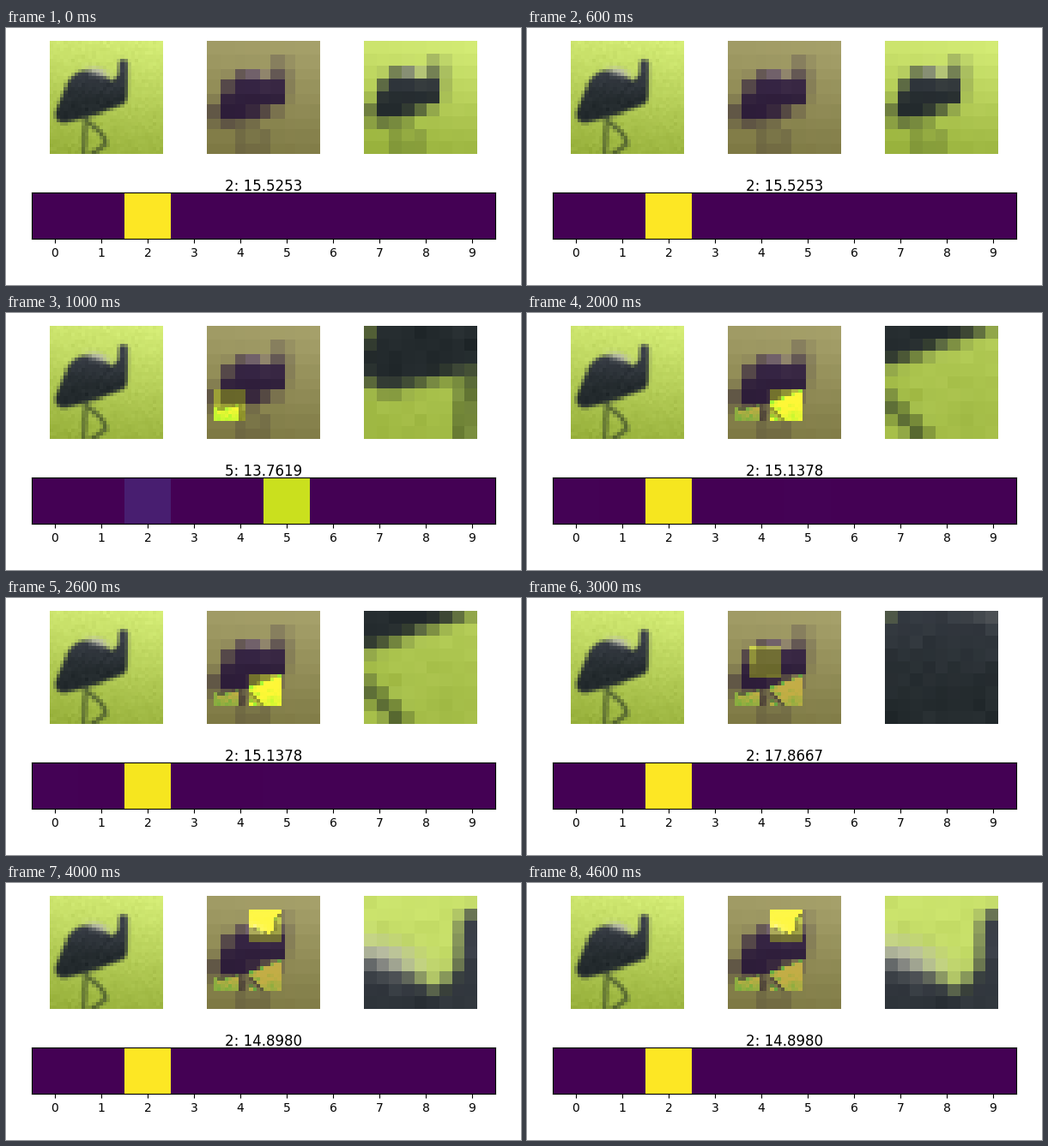
Write a matplotlib script that moves like this. It is 600 px wide and 300 px high and loops after 5000 ms.

```python
import numpy as np
import matplotlib.pyplot as plt
from matplotlib.animation import FuncAnimation

N, G = 32, 9          # picture and glimpse size in cells
FINE = N * G          # sampling grid that divides evenly into both
PURPLE = np.array([68, 1, 84])
YELLOW = np.array([253, 231, 37])

# glimpse corner, title, class scores
STEPS = [
    (None, "2: 15.5253", {2: 1}),
    ((2, 18), "5: 13.7619", {2: .085, 5: .92}),
    ((12, 18), "2: 15.1378", {0: .006, 2: .985, 5: .006}),
    ((6, 10), "2: 17.8667", {2: 1}),
    ((12, 4), "2: 14.8980", {2: 1}),
]

ys, xs = np.mgrid[:FINE, :FINE] / G + .5 / G


def limb(*joints):
    """Soft mask of circles (x, y, radius) swept from joint to joint."""
    gap = np.full(xs.shape, np.inf)
    for a, b in zip(joints, joints[1:]):
        for t in np.linspace(0, 1, 25):
            cx, cy, r = (1 - t) * np.array(a) + t * np.array(b)
            gap = np.minimum(gap, np.hypot(xs - cx, ys - cy) - r)
    return np.clip(.5 - gap / 1.1, 0, 1)[..., None]


def fade(top, bottom, y0, y1):
    t = np.clip((ys - y0) / (y1 - y0), 0, 1)[..., None]
    return np.array(top) * (1 - t) + np.array(bottom) * t


def blend(under, over, mask):
    return under * (1 - mask) + over * mask


def shrink(img, n):
    k = len(img) // n
    return img.reshape(n, k, n, k, 3).mean(axis=(1, 3))


def paint_bird():
    img = fade((210, 234, 115), (153, 178, 61), 0, 32)
    img += .25 * (xs - 14)[..., None]
    legs = np.maximum(
        limb((10.2, 21, .5), (9.7, 32, .5)),
        limb((10.6, 22.5, .5), (14.6, 26.4, .5), (15.9, 29, .5), (12, 32, .5)))
    img = blend(img, np.array([62, 76, 44]), legs)
    body = limb((4, 20.8, 2.4), (10.8, 14.8, 6.5), (18.6, 15.5, 3.2),
                (20.7, 10, 1.3), (20.8, 6.4, 1.2))
    img = blend(img, fade((58, 63, 72), (36, 43, 46), 8, 17), body)
    # pale sheen along the upper back
    dx = xs - 13.8
    sheen = np.exp(-(dx / 2.8) ** 2 - ((ys - 8.8 - .25 * dx) / 1.2) ** 2)
    img = blend(img, np.array([190, 190, 180]), .9 * sheen[..., None])
    grain = np.random.default_rng(4).normal(0, 2.5, (N, N, 1))
    return img + grain.repeat(G, 0).repeat(G, 1)


def to_rgb(img):
    return np.clip(img, 0, 255).astype(np.uint8)


def window(left, top):
    return slice(top, top + G), slice(left, left + G)


fine = paint_bird()
bird, coarse = shrink(fine, N), shrink(fine, G)
spread = np.arange(N) * G // N
base = coarse[spread][:, spread]


def scene(i):
    canvas = base.copy()
    heat = np.tile(PURPLE, (N, N, 1))
    view = coarse
    for corner, *_ in STEPS[1:i + 1]:
        box = window(*corner)
        view = bird[box]
        # grass seen up close is pushed to strong contrast
        vivid = np.clip(np.maximum(8 * (view - 138), .8 * view), 0, 255)
        light = view @ [.3, .59, .11] > 105
        canvas[box][light] = vivid[light]
    if i:
        heat[box] = YELLOW
    return to_rgb(.68 * canvas + .32 * heat), to_rgb(view)


def scores(i):
    row = np.zeros((1, 10))
    for k, v in STEPS[i][2].items():
        row[0, k] = v
    return row


fig = plt.figure(figsize=(6, 3), dpi=100, facecolor="white")


def picture(column, img):
    ax = fig.add_axes([(51 + 183 * column) / 600, .51, 131.9 / 600, .44])
    ax.axis("off")
    return ax.imshow(img, interpolation="nearest", aspect="auto")


first_map, first_view = scene(0)
picture(0, to_rgb(bird))
map_img = picture(1, first_map)
view_img = picture(2, first_view)
view_img.set_extent((0, 1, 0, 1))

bar = fig.add_axes([29.99 / 600, .18, .9, .18])
bar_img = bar.imshow(scores(0), cmap="viridis", vmin=0, vmax=1,
                     aspect="auto", interpolation="nearest")
bar.set_xticks(range(10))
bar.set_yticks([])
title = fig.text(299.99 / 600, 110 / 300, "", ha="center", va="baseline",
                 fontsize=12)


def update(i):
    attention, view = scene(i)
    map_img.set_data(attention)
    view_img.set_data(view)
    bar_img.set_data(scores(i))
    title.set_text(STEPS[i][1])
    return map_img, view_img, bar_img, title


anim = FuncAnimation(fig, update, frames=len(STEPS), interval=1000, repeat=True)
plt.show()
```
